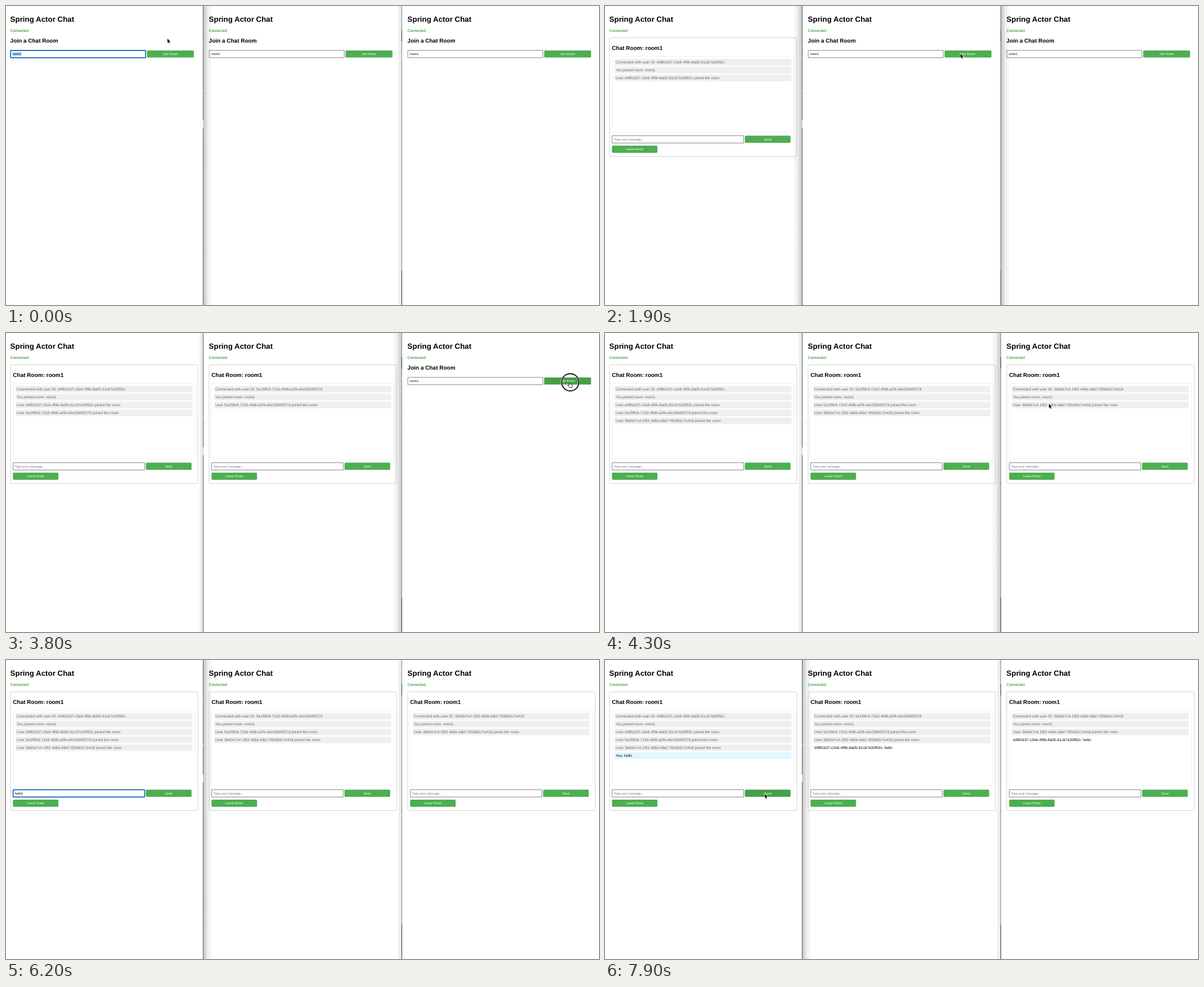
An HTML page with a canvas for the animation above (8 s loop, 1054x531 px).

```html
<!DOCTYPE html>
<html lang="en">
<head>
<meta charset="utf-8">
<title>Spring Actor Chat</title>
<style>
  html, body { margin: 0; width: 100%; height: 100%; overflow: hidden; background: #fff; }
  canvas { display: block; width: 1054px; height: 531px; }
</style>
</head>
<body>
<canvas id="stage" width="1054" height="531"></canvas>
<script>
const ctx = document.getElementById('stage').getContext('2d');
const W = 1054, H = 531, LOOP = 8000, STEP = 100;
const PANEL = 353;
const GREEN = '#4caf50', GREEN_HOVER = '#45a049', BLUE = '#1161b5';
const H1 = 13.33, H2 = 10, BODY = 6.67, SMALL = 5.55;

const USERS = [
  'd4f81b37-c2e6-4f9b-8a05-61cb7e30f92c',
  '5e1f9fc6-71b3-4fd8-a2f4-e6c03b95f27d',
  '3b60e7c4-1f92-4d5e-b8a7-f05d62c7e418'
];
const JOINED = [1100, 2400, 4100];
const HOVER = [[500, 1100], [2000, 2400], [3500, 4100]];
const CLICKS = [[800, 1000, 0], [2100, 2300, 1], [3700, 3900, 2]];
const FOCUS = [[0, 0], [1800, 1], [3500, 2], [4700, 0]];
const TYPED = [5900, 5950, 6000, 6100, 6200];
const INPUT_ON = 5200, INPUT_OFF = 7200, SENT = 7400;
const HANDS = [[500, 1400], [2000, 4300], [7000, 7600]];
const HIDDEN = [5900, 6300];
const PATH = [
  [0, 287, 58], [100, 287, 58], [600, 279, 82], [1200, 279, 82],
  [1700, 632, 85], [2700, 632, 85], [3100, 870, 93.5], [3500, 1002, 87.5],
  [4100, 1002, 87.5], [4700, 181, 236], [5200, 181, 236], [5700, 184, 338],
  [6300, 184, 338], [6700, 180, 236], [7000, 284, 238], [8000, 284, 238]
];

const within = (t, [from, to]) => t >= from && t < to;

// Text is set large and scaled down evenly, so letter spacing stays exact.
function text(str, x, y, size, color, bold = false, align = 'left') {
  ctx.save();
  ctx.translate(x, y);
  ctx.scale(0.1, 0.1);
  ctx.font = (bold ? 'bold ' : '') + size * 10 + 'px "Liberation Sans", Arial, sans-serif';
  ctx.textRendering = 'geometricPrecision';
  ctx.textAlign = align;
  ctx.fillStyle = color;
  ctx.fillText(str, 0, 0);
  ctx.restore();
}

function rect(x, y, w, h, color) {
  ctx.fillStyle = color;
  ctx.fillRect(x, y, w, h);
}

function rounded(x, y, w, h, r, fill) {
  ctx.beginPath();
  ctx.roundRect(x, y, w, h, r);
  ctx.fillStyle = fill;
  ctx.fill();
}

function outline(x, y, w, h, color, line, r = 0) {
  ctx.beginPath();
  ctx.roundRect(x, y, w, h, r);
  ctx.strokeStyle = color;
  ctx.lineWidth = line;
  ctx.stroke();
}

function button(label, x, y, w, h, hover) {
  rounded(x, y, w, h, 1.7, hover ? GREEN_HOVER : GREEN);
  text(label, x + w / 2, y + h / 2 + 2, SMALL, '#fff', false, 'center');
}

function field(x, y, w, h, focused) {
  outline(x, y, w, h, focused ? BLUE : '#767676', focused ? 1.7 : 0.9, focused ? 0.8 : 0);
}

function messages(i, t) {
  const list = [
    'Connected with user ID: ' + USERS[i],
    'You joined room: room1'
  ].map(str => ({ str, bg: '#efefef', color: '#666' }));
  for (let k = i; k < 3; k++) {
    if (t >= JOINED[k]) list.push({ str: `User ${USERS[k]} joined the room`, bg: '#efefef', color: '#666' });
  }
  if (t >= SENT) {
    list.push(i === 0
      ? { str: 'You: hello', bg: '#e3f5fe', color: '#000' }
      : { str: USERS[0] + ': hello', color: '#000' });
  }
  return list;
}

function joinForm(i, t, px) {
  const focused = i === 0;
  text('Join a Chat Room', px + 7.6, 65.4, H2, '#000', true);
  if (focused) rect(px + 11.5, 81.8, 16, 6.6, '#b5d6fb');
  field(px + 8.2, 78.8, 240, 13, focused);
  text('room1', px + 11.6, 87.3, SMALL, '#000');
  button('Join Room', px + 250.5, 79, 83.4, 12.6, within(t, HOVER[i]));
}

function chatRoom(i, t, px) {
  outline(px + 8, 56.5, 333, 210.8, '#ccc', 0.9, 1.7);
  text('Chat Room: room1', px + 12.3, 78.2, H2, '#000', true);
  outline(px + 12.5, 89.5, 324, 134, '#eee', 0.8);
  messages(i, t).forEach((m, n) => {
    const y = 94 + n * 14;
    if (m.bg) rounded(px + 17, y, 314.6, 11.7, 2, m.bg);
    text(m.str, px + 19, y + 8.2, BODY, m.color);
  });

  const focused = i === 0 && within(t, [INPUT_ON, INPUT_OFF]);
  const typed = i === 0 && t < SENT ? 'hello'.slice(0, TYPED.filter(k => t >= k).length) : '';
  field(px + 12.6, 230.3, 233.8, 13, focused);
  text(typed || 'Type your message...', px + 15.7, 238.9, SMALL, typed ? '#000' : '#757575');
  if (focused) rect(px + 15.6 + typed.length * 2.46, 233.8, 0.7, 6.4, '#000');
  button('Send', px + 248.6, 230.3, 81.2, 12.8, i === 0 && t >= 7000);
  button('Leave Room', px + 12.3, 248, 80.9, 12.8);
}

function panel(i, t) {
  const px = i * PANEL;
  text('Spring Actor Chat', px + 7.6, 28.2, H1, '#000', true);
  text('Connected', px + 7.6, 46.4, BODY, '#008000');
  (t < JOINED[i] ? joinForm : chatRoom)(i, t, px);
}

// Shade falling from a window edge; dir is -1 to the left, 1 to the right.
function shadow(x, dir, size, stops) {
  const g = ctx.createLinearGradient(x, 0, x + dir * size, 0);
  stops.forEach(([at, a]) => g.addColorStop(at, `rgba(0,0,0,${a})`));
  rect(dir < 0 ? x - size : x, 0, size, H, g);
}

function seams(focus) {
  const deep = (x, dir) => shadow(x, dir, 14, [[0, 0.22], [0.45, 0.1], [0.55, 0.06], [1, 0.03]]);
  const soft = x => shadow(x, -1, 6, [[0, 0.1], [1, 0.04]]);

  if (focus === 0) { deep(351, 1); soft(703); }
  if (focus === 1) { deep(350, -1); deep(704, 1); }
  if (focus === 2) { soft(350); deep(703, -1); }

  rect(350, 0, 1, H, '#555');
  rect(350, 203, 1, 14, '#d0d0d0');
  rect(350, 72, 1, 1, '#aaa');
  rect(350, 150, 1, 2, '#aaa');
  rect(703, 0, 1, H, focus === 1 ? '#666' : '#8c8c8c');
  rect(703, 43, 1, 20, '#333');
  rect(703, 267, 1, 1, '#222');
  rect(703, 470, 1, H - 470, '#333');
}

function cursorAt(t) {
  const n = PATH.findIndex(k => k[0] > t);
  const [t0, x0, y0] = PATH[n - 1], [t1, x1, y1] = PATH[n];
  const u = (t - t0) / (t1 - t0), e = u * u * (3 - 2 * u);
  return [x0 + (x1 - x0) * e, y0 + (y1 - y0) * e];
}

function arrow() {
  const p = new Path2D('M0 0V7.2L1.6 5.7 2.8 8.6 4.1 8 2.9 5.2H5.1Z');
  ctx.strokeStyle = '#fff';
  ctx.lineWidth = 1.2;
  ctx.stroke(p);
  ctx.fillStyle = '#000';
  ctx.fill(p);
}

function hand() {
  const p = new Path2D('M-.9 5.5V.8Q0-.4.9.8V3.3Q1.8 2.7 2.3 3.6 3.2 3.1 3.7 4 4.8 3.6 4.9 5V6.4L4.1 9H-.9L-3.2 5.8Q-3.2 4.4-2 4.8Z');
  ctx.fillStyle = '#fff';
  ctx.fill(p);
  ctx.strokeStyle = '#000';
  ctx.lineWidth = 0.8;
  ctx.lineJoin = 'round';
  ctx.stroke(p);
}

function ring(x, y) {
  ctx.beginPath();
  ctx.arc(x, y, 15.3, 0, Math.PI * 2);
  ctx.strokeStyle = '#fff';
  ctx.lineWidth = 3;
  ctx.stroke();
  ctx.strokeStyle = '#111';
  ctx.lineWidth = 1.9;
  ctx.stroke();
}

function pointer(t) {
  if (within(t, HIDDEN)) return;
  const [x, y] = cursorAt(t);
  if (CLICKS.some(c => within(t, c))) ring(x + 0.9, y);
  ctx.save();
  ctx.translate(x, y);
  (HANDS.some(s => within(t, s)) ? hand : arrow)();
  ctx.restore();
}

function draw() {
  const t = Math.floor(performance.now() % LOOP / STEP) * STEP;
  rect(0, 0, W, H, '#fff');
  for (let i = 0; i < 3; i++) panel(i, t);
  seams(FOCUS.filter(f => t >= f[0]).pop()[1]);
  pointer(t);
  requestAnimationFrame(draw);
}
draw();
</script>
</body>
</html>
```
